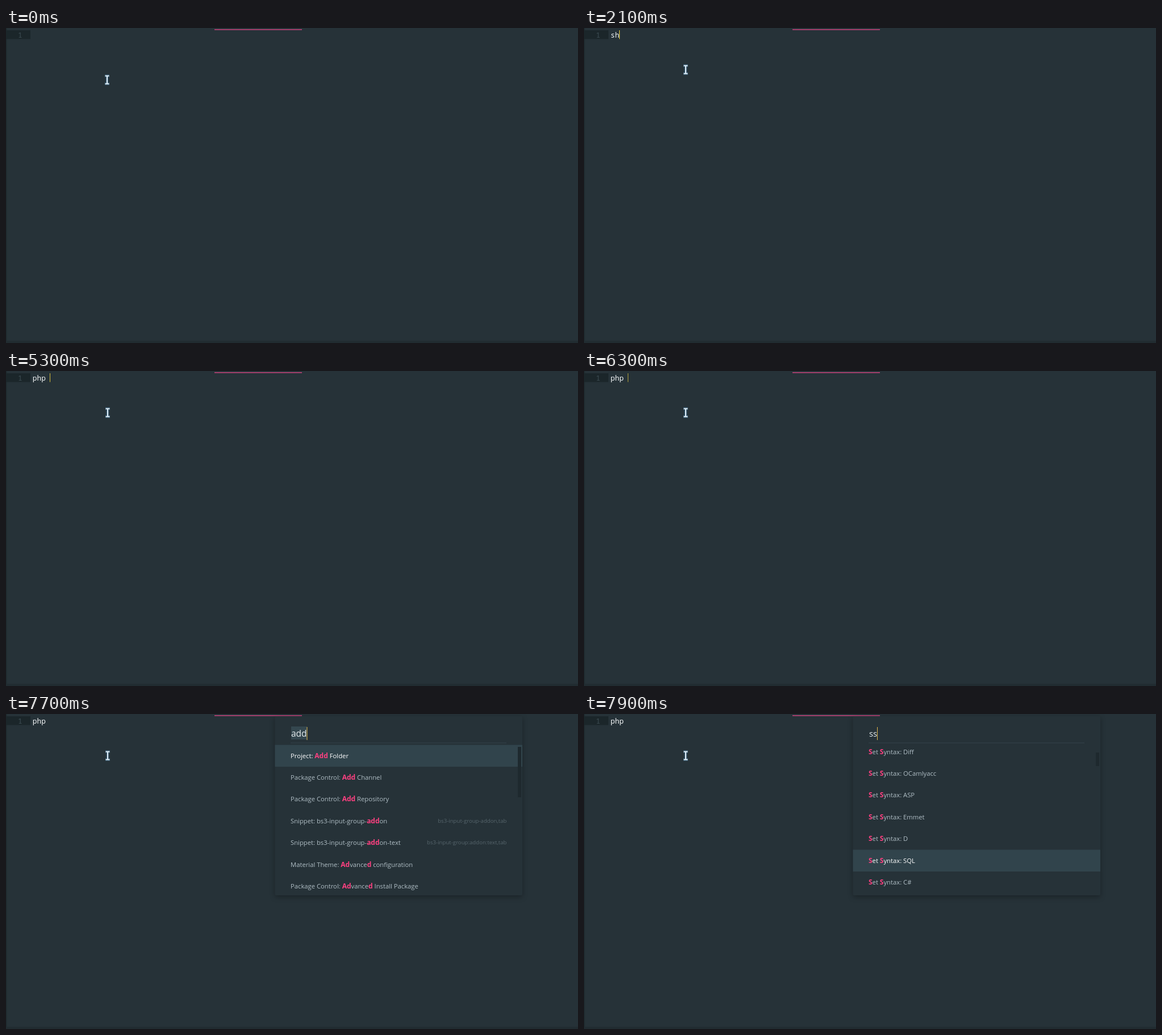
An HTML page that plays this animation: 1007 by 556 pixels, repeating every 8000 ms.

```html
<!DOCTYPE html>
<html lang="en">
<head>
<meta charset="utf-8">
<title>Editor</title>
<style>
  html, body { margin: 0; width: 100%; height: 100%; overflow: hidden; background: #263238; }
  svg { display: block; width: 100vw; height: 100vh; }
  text { white-space: pre; font-family: "Open Sans", sans-serif; }
  .mono { font: 12.8px "Noto Sans Mono", monospace; }
  .row { font-size: 11.25px; fill: #b0bec5; }
  .row.on { fill: #fff; }
  .hit { font-size: 12px; font-weight: 700; fill: #ff4081; }
  .hint { font-size: 9.65px; fill: #56656c; text-anchor: end; }
  #panel { filter: drop-shadow(0 3px 5px rgba(0, 0, 0, .3)); }
</style>
</head>
<body>
<svg viewBox="0 0 1007 556">
  <defs><clipPath id="list"><rect x="473" y="52" width="436" height="268"/></clipPath></defs>
  <rect width="1007" height="556" fill="#263238"/>
  <rect width="1.5" height="556" fill="#1f2a2f"/>
  <rect y="552" width="1007" height="4" fill="#212c31"/>
  <rect y="4" width="43" height="15.5" fill="#1b262a"/>
  <text class="mono" x="21" y="16.5" fill="#3e4d54">1</text>
  <rect x="367" y="2" width="154" height="1.6" fill="#c2437a"/>
  <text class="mono" id="code" x="46.8" y="16.5" fill="#f2f5f6"/>
  <rect id="caret" y="4" width="1" height="15.5" fill="#f5d63d"/>
  <g id="mouse">
    <path d="M-4 -7H4M-4 7H4M0 -7V7" fill="none" stroke="#4d87b5" stroke-width="5" stroke-linejoin="round" opacity=".4"/>
    <path d="M-3.5 -7H3.5M-3.5 7H3.5M0 -7V7" fill="none" stroke="#e2f1fc" stroke-width="2"/>
  </g>
  <g id="panel">
    <rect x="473.5" y="4" width="435.5" height="316" rx="2" fill="#263238"/>
    <rect x="501" y="50.5" width="380" height="1" fill="#34434a"/>
    <rect id="picked" x="502" y="22" width="28" height="23" fill="#34474f"/>
    <text id="query" x="502" y="40" font-size="15.5" fill="#e6ecee"/>
    <rect id="queryCaret" y="23" width="1" height="23" fill="#e0b64c"/>
    <g id="rows" clip-path="url(#list)"/>
  </g>
</svg>
<script>
const $ = id => document.getElementById(id);
const LOOP = 8000, CHAR = 7.68, ROW = 38.4;

const typing = [[0, ""], [1900, "s"], [2100, "sh"], [3500, "s"], [3700, ""],
  [4500, "p"], [4700, "ph"], [4900, "php"], [5100, "php "], [7100, "php"]];
const blink = [[0, 0], [600, 0], [900, 1], [1100, 1], [1400, 0], [1700, 0], [1800, 1],
  [2300, 1], [2700, 0], [2900, 0], [3200, 1], [5200, 1], [5300, .85], [5600, 0],
  [5900, 1], [6200, 1], [6500, 0], [6700, 0], [6900, 1], [7400, 1], [7500, 0], [LOOP, 0]];

// Asterisks enclose the matched letters; "|" starts the right-hand hint.
const commands = ["Project: *Add* Folder", "Package Control: *Add* Channel",
  "Package Control: *Add* Repository",
  "Snippet: bs3-input-group-*add*on|bs3-input-group-addon,tab",
  "Snippet: bs3-input-group-*add*on-text|bs3-input-group:addon:text,tab",
  "Material Theme: *Ad*vance*d* configuration",
  "Package Control: *Ad*vance*d* Install Package"];
const syntaxes = ["Diff", "OCamlyacc", "ASP", "Emmet", "D", "SQL", "C#"]
  .map(name => "*S*et *S*yntax: " + name);

const palettes = [
  { from: 7500, query: "add", rows: commands, y: 73.6, on: 0, bar: [58, 89] },
  { from: 7800, query: "s", caret: 509, rows: syntaxes, y: 66.6, on: 5, bar: [68, 24] },
  { from: 7900, query: "ss", caret: 516, rows: syntaxes, y: 66.6, on: 5, bar: [68, 24] }
];

function rowMarkup(p, line, i) {
  const y = p.y + i * ROW, on = i === p.on;
  const [label, hint] = line.split("|");
  const rich = label.replace(/\*(.+?)\*/g, '<tspan class="hit">$1</tspan>');
  return (on ? `<rect x="473.5" y="${y - 19}" width="435.5" height="38.4" fill="#31444c"/>` : "") +
    `<text class="row${on ? " on" : ""}" x="501" y="${y + 4}">${rich}</text>` +
    (hint ? `<text class="hint" x="881.5" y="${y + 3}">${hint}</text>` : "");
}

let shown;
function showPalette(p) {
  if (p === shown) return;
  shown = p;
  $("panel").style.display = p ? "" : "none";
  if (!p) return;
  const first = p.query === "add";
  $("picked").style.display = first ? "" : "none";
  $("query").textContent = p.query;
  $("query").setAttribute("font-size", first ? 15.5 : 14.8);
  $("queryCaret").setAttribute("x", p.caret || 529.5);
  $("rows").innerHTML = p.rows.map((line, i) => rowMarkup(p, line, i)).join("") +
    `<rect x="901" y="${p.bar[0]}" width="6" height="${p.bar[1]}" fill="#1e292e"/>`;
}

const current = (list, t, time) => list.filter(item => time(item) <= t).pop();

function mix(points, t) {
  const i = points.findIndex(p => p[0] > t);
  const [t0, a] = points[i - 1], [t1, b] = points[i];
  return a + (b - a) * (t - t0) / (t1 - t0);
}

function draw(now) {
  const t = Math.floor(now % LOOP / 100) * 100;
  const code = current(typing, t, k => k[0])[1];
  $("code").textContent = code;
  $("caret").setAttribute("x", Math.round(46.3 + CHAR * code.length));
  $("caret").setAttribute("opacity", mix(blink, t));

  const k = Math.min(t / 500, 1);
  const x = 178 + k + 5 * Math.sin(Math.PI * k);
  const y = 91.5 - 18 * k * k * (3 - 2 * k);
  $("mouse").setAttribute("transform", `translate(${x} ${y})`);

  showPalette(current(palettes, t, p => p.from) || null);
}

const start = performance.now();
function tick() {
  draw(performance.now() - start);
  requestAnimationFrame(tick);
}
tick();
</script>
</body>
</html>
```
